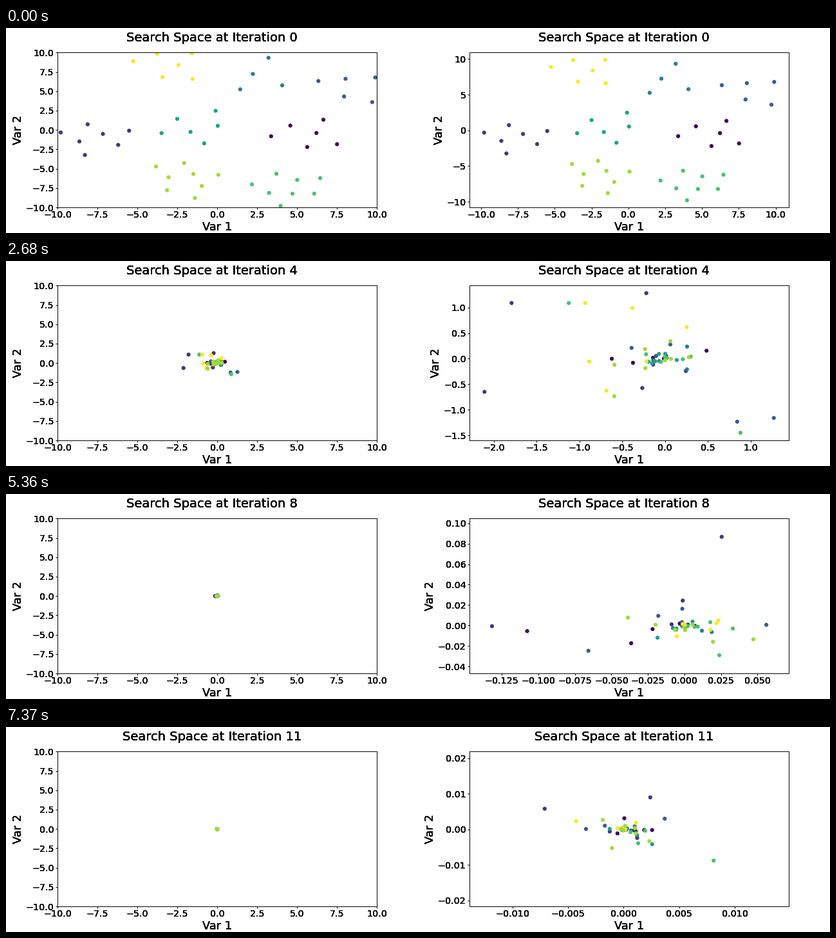
A matplotlib script that plays this animation: 1280 by 320 pixels, repeating every 8 s.

```python
import numpy as np
import matplotlib.pyplot as plt
from matplotlib.animation import FuncAnimation
from matplotlib.axes import Axes

W, H, DPI = 1280, 320, 64
LOOP, TICK, HOLD = 8000, 50, 670
STEPS = 12
PASSES = 4   # lettering is painted several times for a heavier look

plt.rcParams.update({
    "font.family": "DejaVu Sans", "xtick.labelsize": 16,
    "ytick.labelsize": 16, "axes.labelsize": 20, "axes.labelpad": 3,
    "axes.linewidth": 1.1, "xtick.major.width": 1.1, "ytick.major.width": 1.1,
    "xtick.major.pad": 2.5, "ytick.major.pad": 2.5,
})

# Groups of agents, one colour each; lime is drawn last
SIZES = [6, 7, 5, 4, 6, 8, 6, 8]
CENTERS = [(5.6, -0.5), (-8, -1.2), (8.6, 5.2), (3.1, 6.4),
           (-1.4, 0.2), (4.6, -7.1), (-3.4, 7.8), (-2.2, -5.8)]
COLORS = plt.get_cmap("viridis")(np.linspace(0, 1, 8))[[0, 1, 2, 3, 4, 5, 7, 6]]

# The outermost agents (west, east, north, south) at key iterations
SCOUTS = [6, 13, 7, 28]
KEYS = {
    2: [(-3.29, -0.83), (2.11, -1.9), (0.52, 3.62), (1.76, -5.13)],
    4: [(-2.11, -0.65), (1.27, -1.16), (-0.22, 1.28), (0.88, -1.45)],
    5: [(-1.96, 0), (1.12, -1.03), (0.03, 0.75), (-0.03, -0.38)],
    7: [(-0.373, -0.0595), (0.077, 0.028), (0.044, 0.1255), (0.034, -0.042)],
    9: [(-0.0465, 0.018), (0.0407, -0.0075), (0.0147, 0.06), (0.0167, -0.02)],
    11: [(-0.0071, 0.0058), (0.0037, 0.003), (0.0024, 0.009), (0.0081, -0.0088)],
}


def start():
    """Sunflower patch around each centre, stretched over the search space."""
    parts = []
    for g, (size, center) in enumerate(zip(SIZES, CENTERS)):
        i = np.arange(size)
        r, a = 2.6 * np.sqrt((i + 0.5) / size), 2.4 * i + g
        parts.append(center + np.column_stack([r * np.cos(a), r * np.sin(a)]))
    pts = np.vstack(parts)
    lo, hi = pts.min(axis=0), pts.max(axis=0)
    return -9.8 + 19.7 * (pts - lo) / (hi - lo)


def scouts_at(it):
    """Interpolate the scouts on a signed logarithmic scale."""
    logs = np.arcsinh(1e3 * np.array(list(KEYS.values())))
    mix = np.apply_along_axis(lambda v: np.interp(it, list(KEYS), v), 0, logs)
    return np.sinh(mix) / 1e3


def gathered(it):
    """Long-tailed cloud around the optimum, inside the scouts' box."""
    rng = np.random.default_rng(it)
    scouts = scouts_at(it)
    lo, hi = scouts.min(axis=0), scouts.max(axis=0)
    spread = (0.12 + 0.2 / it) * (hi - lo) / 2
    n = sum(SIZES)
    pts = spread * rng.normal(size=(n, 2)) * rng.exponential(size=(n, 1))
    pts = pts.clip(0.85 * lo, 0.85 * hi)
    pts[SCOUTS] = scouts
    return pts


swarms = [start(), None] + [gathered(it) for it in range(2, STEPS)]
swarms[1] = 0.6 * swarms[0] + 0.4 * swarms[2]


class StrongAxes(Axes):
    def draw(self, renderer):
        super().draw(renderer)
        for k, axis in enumerate((self.xaxis, self.yaxis)):
            lo, hi = axis.get_view_interval()
            labels = [axis.label] + [t for t in axis.get_ticklabels()
                                     if lo <= t.get_position()[k] <= hi]
            for label in labels * (PASSES - 1):
                label.draw(renderer)


fig = plt.figure(figsize=(W / DPI, H / DPI), dpi=DPI, facecolor="white")


def panel(left):
    ax = StrongAxes(fig, [left / W, 0.125, 496 / W, 0.755])
    fig.add_axes(ax)
    ax.set(xlabel="Var 1", ylabel="Var 2", xlim=(-10, 10), ylim=(-10, 10))
    dots = ax.scatter(*swarms[0].T, c=np.repeat(COLORS, SIZES, axis=0))
    return ax, dots


(full, full_dots), (zoom, zoom_dots) = panel(80), panel(720)
titles = [fig.text(x, 0.98, "", size=22, ha="center", va="top")
          for x in (0.25, 0.75) for _ in range(PASSES)]


def update(frame):
    it = (frame * TICK + TICK - 1) // HOLD
    pts = swarms[it]
    for title in titles:
        title.set_text(f"Search Space at Iteration {it}")
    for dots in (full_dots, zoom_dots):
        dots.set_offsets(pts)
    lo, hi = pts.min(axis=0), pts.max(axis=0)
    margin = 0.05 * (hi - lo) + (0.006, 0.012)
    zoom.set(xlim=(lo[0] - margin[0], hi[0] + margin[0]),
             ylim=(lo[1] - margin[1], hi[1] + margin[1]))
    return [*titles, full_dots, zoom_dots]


anim = FuncAnimation(fig, update, frames=LOOP // TICK, interval=TICK,
                     repeat=True, repeat_delay=0, blit=False)
plt.show()
```
